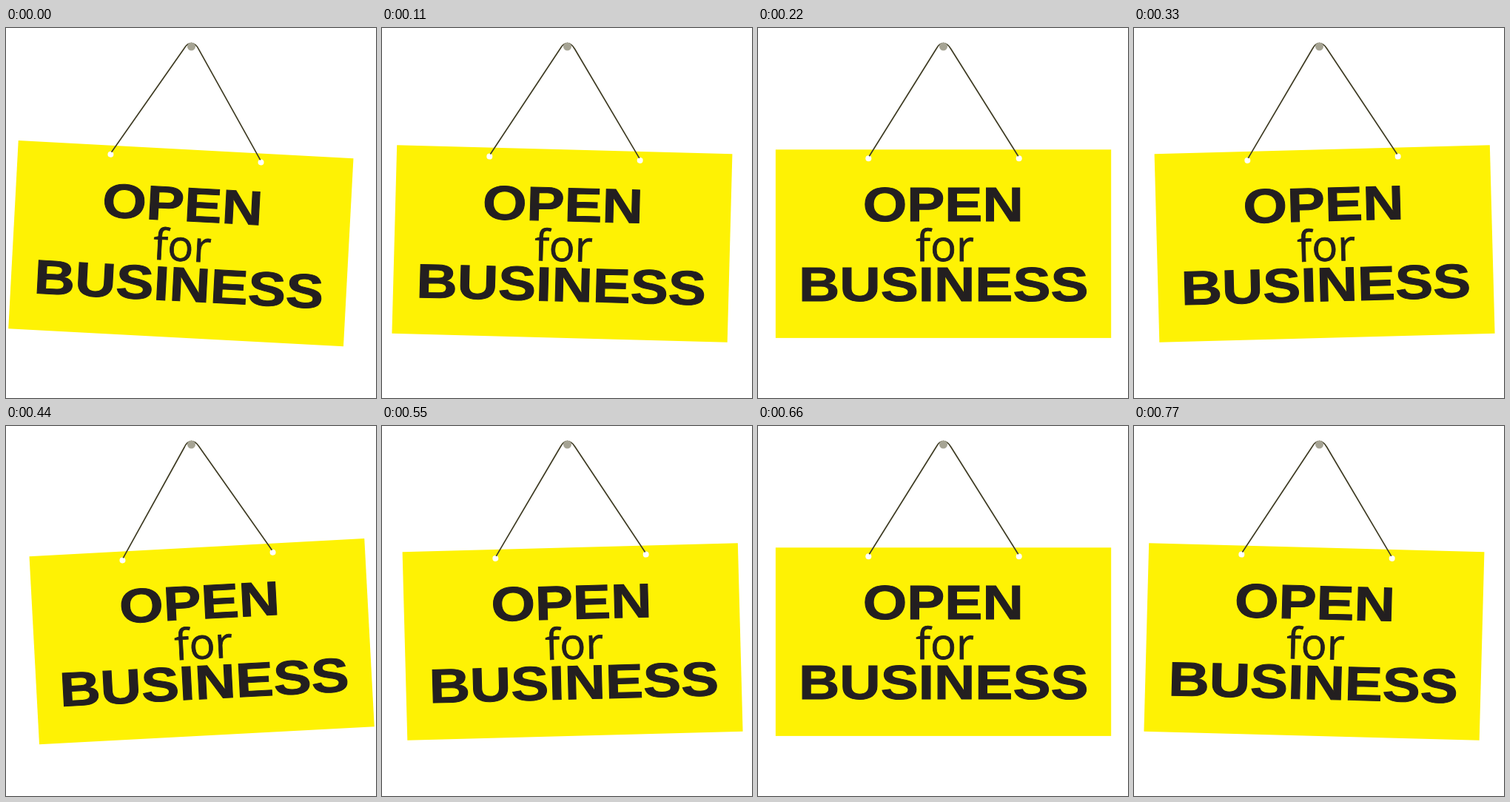
An HTML page with a canvas for the animation above (0.88 s loop, 500 px wide and 500 px high).

```html
<!DOCTYPE html>
<html lang="en">
<head>
<meta charset="utf-8">
<title>Open for business</title>
<style>
  html, body { margin: 0; width: 100%; height: 100%; overflow: hidden; background: #fff; }
  canvas { display: block; width: 500px; height: 500px; }
</style>
</head>
<body>
<canvas id="stage" width="500" height="500"></canvas>
<script>
const ctx = document.getElementById('stage').getContext('2d');

const STEP_MS = 110;
const STEPS = 8;
const SWING = 3.04 * Math.PI / 180;
const NAIL = { x: 250.5, y: 25 };
const BOARD = { x: 23.8, y: 164.3, w: 453.4, h: 254.6 };
const HOLES = [149.3, 352.7];
const HOLE_Y = 176.3;
const INK = '#231f20';
const WIDE = 1.178; // proportion of the extended bold face

function disc(x, y, r, color) {
  ctx.fillStyle = color;
  ctx.beginPath();
  ctx.arc(x, y, r, 0, Math.PI * 2);
  ctx.fill();
}

function label(text, x, baseline, font, wide, weight) {
  ctx.save();
  ctx.translate(x, baseline);
  ctx.scale(wide, 1);
  ctx.font = font;
  ctx.textAlign = 'center';
  ctx.fillStyle = ctx.strokeStyle = INK;
  ctx.lineWidth = weight;
  ctx.fillText(text, 0, 0);
  ctx.strokeText(text, 0, 0);
  ctx.restore();
}

function drawString() {
  ctx.strokeStyle = '#403d25';
  ctx.lineWidth = 1.7;
  ctx.beginPath();
  ctx.moveTo(HOLES[0] + 1, HOLE_Y - 3);
  ctx.lineTo(241, 28);
  ctx.quadraticCurveTo(245, 20.5, 250.5, 20.5);
  ctx.quadraticCurveTo(256, 20.5, 260.5, 28);
  ctx.lineTo(HOLES[1] - 1, HOLE_Y - 3);
  ctx.stroke();
}

function drawSign(angle) {
  ctx.save();
  ctx.translate(NAIL.x, NAIL.y);
  ctx.rotate(angle);
  ctx.translate(-NAIL.x, -NAIL.y);

  ctx.fillStyle = '#fef204';
  ctx.fillRect(BOARD.x, BOARD.y, BOARD.w, BOARD.h);
  for (const x of HOLES) disc(x, HOLE_Y, 4, '#fff');

  const bold = 'bold 65px "Liberation Sans", Arial, sans-serif';
  label('OPEN', 250.2, 261, bold, WIDE, 1);
  label('for', 252.5, 315, '58px "Open Sans", "Noto Sans", sans-serif', 1, 0.8);
  label('BUSINESS', 250.8, 369.2, bold, WIDE, 1);

  drawString();
  ctx.restore();
}

// Triangle swing: full right, through the middle, full left and back.
function swingAt(ms) {
  const step = Math.floor(ms / STEP_MS) % STEPS;
  return SWING * (Math.abs(step - STEPS / 2) / (STEPS / 4) - 1);
}

function draw(ms) {
  ctx.fillStyle = '#fff';
  ctx.fillRect(0, 0, 500, 500);
  drawSign(swingAt(ms));
  disc(NAIL.x, NAIL.y, 5.5, '#a6a494');
}

function tick() {
  draw(performance.now());
  requestAnimationFrame(tick);
}
tick();
</script>
</body>
</html>
```
